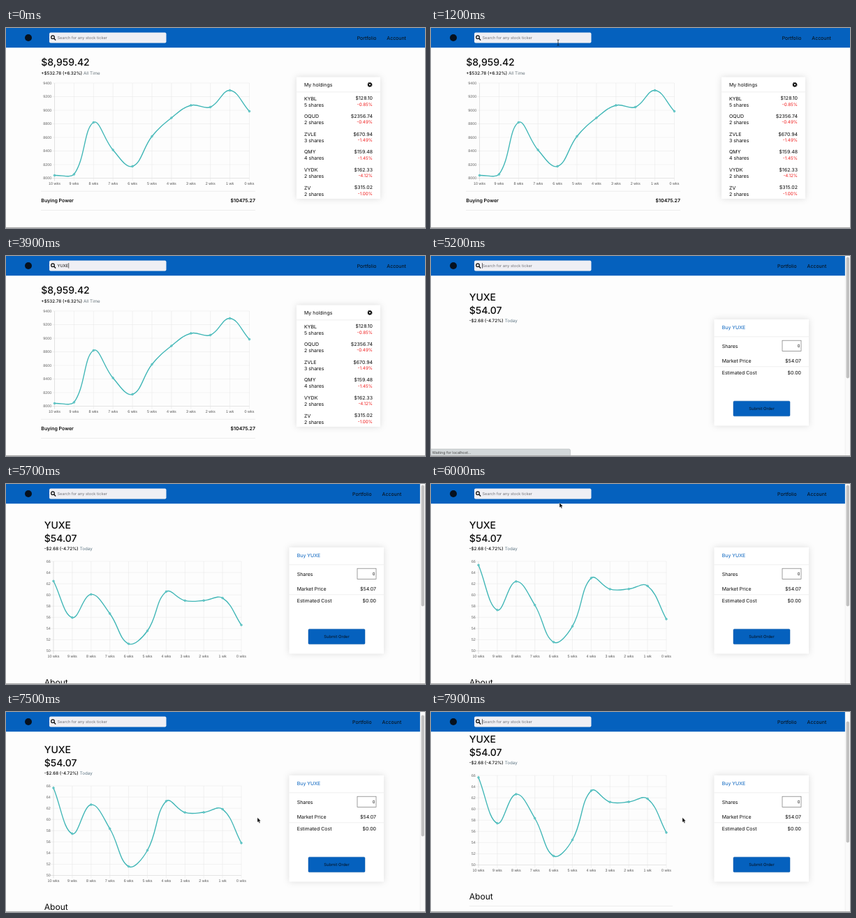
An HTML page for the animation above (8 s loop, 600 px wide and 287 px high).

```html
<!DOCTYPE html>
<html lang="en">
<head>
<meta charset="utf-8">
<title>Stock trading demo</title>
<style>
  html, body { margin: 0; width: 100%; height: 100%; overflow: hidden; background: #fdfdfd; }
  svg { display: block; width: 600px; height: 287px; }
  text { font-family: Inter, "Open Sans", sans-serif; text-rendering: geometricPrecision; white-space: pre; }
  .axis { font-family: "Liberation Sans", Arial, sans-serif; }
  .card { filter: drop-shadow(0 0 5px rgba(0, 0, 0, .13)); }
</style>
</head>
<body>
<svg id="stage" viewBox="0 0 600 287"></svg>
<script>
const LOOP = 8000, STEP = 100;
const BLUE = '#0561be', TEAL = '#3fb6b6', RED = '#f01e1e';
const TICKER = 'YUXE';

const text = (x, y, str, size = 7, opt = {}) => {
  const { fill = '#0a0a0a', weight = 400, anchor = 'start', cls = '' } = opt;
  return `<text x="${x}" y="${y}" font-size="${size}" fill="${fill}" font-weight="${weight}" text-anchor="${anchor}" class="${cls}">${str}</text>`;
};
const right = (x, y, str, size = 7, opt = {}) => text(x, y, str, size, { ...opt, anchor: 'end' });
const rect = (x, y, w, h, fill, extra = '') =>
  `<rect x="${x}" y="${y}" width="${w}" height="${h}" fill="${fill}" ${extra}/>`;
const line = (x1, y1, x2, y2, color = '#e4e4e4', w = .5) =>
  `<path d="M${x1} ${y1}L${x2} ${y2}" stroke="${color}" stroke-width="${w}"/>`;

// Chart geometry
const homeChart = {
  left: 69.5, right: 348.5, top: 79, bottom: 215.5, min: 8000, max: 9400, step: 200,
  ys: [211.5, 210, 135.5, 175, 198.5, 155.5, 129, 111, 113.5, 89.5, 119.5]
};
const stockChart = {
  left: 68, right: 337, top: 111, bottom: 239.5, min: 50, max: 66, step: 2,
  ys: [114, 179.7, 138, 172.5, 226.7, 203.5, 133, 149.2, 149, 144.5, 193]
};

function grid(c) {
  let out = '';
  const n = (c.max - c.min) / c.step;
  for (let i = 0; i <= n; i++) {
    const y = c.bottom - (c.bottom - c.top) * i / n;
    out += line(c.left - 4, y, c.right, y, i ? '#e4e4e4' : '#cccccc');
    out += right(c.left - 4.3, y + 1.9, c.min + i * c.step, 5.4, { fill: '#666', cls: 'axis' });
  }
  for (let i = 0; i <= 10; i++) {
    const x = c.left + (c.right - c.left) * i / 10;
    const weeks = 10 - i;
    out += line(x, c.top, x, c.bottom + 4, i ? '#e4e4e4' : '#c4c4c4');
    out += text(x, c.bottom + 9.8, weeks + (weeks === 1 ? ' wk' : ' wks'), 5.4,
      { fill: '#555', anchor: 'middle', cls: 'axis' });
  }
  return out;
}

// Smooth curve with tension .4, scaled up from the baseline by k
function curve(c, k = 1) {
  const pts = c.ys.map((y, i) => [c.left + (c.right - c.left) * i / 10, y]);
  const clamp = y => Math.max(c.top, Math.min(c.bottom, y));
  const grow = y => c.bottom - (c.bottom - y) * k;
  const at = (x, y) => `${x.toFixed(2)} ${grow(clamp(y)).toFixed(2)}`;
  const handles = pts.map((p, i) => {
    const a = pts[i - 1] || p, b = pts[i + 1] || p;
    const da = Math.hypot(p[0] - a[0], p[1] - a[1]);
    const db = Math.hypot(b[0] - p[0], b[1] - p[1]);
    const fa = .4 * da / (da + db), fb = .4 * db / (da + db);
    const dx = b[0] - a[0], dy = b[1] - a[1];
    return { before: [p[0] - fa * dx, p[1] - fa * dy], after: [p[0] + fb * dx, p[1] + fb * dy] };
  });
  let d = 'M' + at(...pts[0]);
  for (let i = 1; i < pts.length; i++)
    d += `C${at(...handles[i - 1].after)} ${at(...handles[i].before)} ${at(...pts[i])}`;
  const dots = pts.map(p =>
    `<circle cx="${p[0]}" cy="${grow(p[1])}" r="1.4" fill="#6cc9c9" stroke="${TEAL}" stroke-width=".5"/>`);
  return `<path d="${d}" fill="none" stroke="${TEAL}" stroke-width="1.35"/>` + dots.join('');
}

const holdings = [
  ['KYBL', 5, '128.10', '0.85'], ['OQUD', 2, '2356.74', '0.49'], ['ZVLE', 3, '670.94', '1.49'],
  ['QMY', 4, '159.48', '1.45'], ['VYDK', 2, '162.33', '4.12'], ['ZV', 2, '315.02', '1.00']
];

function homePage() {
  const rows = holdings.map(([name, count, price, loss], i) => {
    const y = 103.5 + 25.6 * i;
    return text(427, y, name) + text(427, y + 9, count + ' shares') +
      right(525, y - .2, '$' + price) + right(525, y + 8.2, `-${loss}%`, 6.3, { fill: RED });
  });
  const gear = `<g fill="none" stroke="#0a0a0a"><circle cx="521" cy="81.3" r="2" stroke-width="1.7"/>
    <circle cx="521" cy="81.3" r="3" stroke-width="1.1" stroke-dasharray="1.178"/></g>`;
  return text(50.3, 54.1, '$8,959.42', 14, { weight: 450 }) +
    text(50.3, 66.8, '+$532.78 (+6.32%)', 6.25, { weight: 500 }) +
    text(111, 66.8, 'All Time', 6.25, { fill: '#68757c' }) +
    grid(homeChart) + curve(homeChart) +
    line(50, 234.3, 357, 234.3, '#dcdcdc') + line(50, 261.5, 357, 261.5, '#dcdcdc') +
    text(50.3, 250.4, 'Buying Power', 7, { weight: 600 }) +
    right(357, 250.4, '$10475.27', 7, { weight: 600 }) +
    rect(416, 70.5, 120, 174.5, '#fff', 'class="card"') +
    text(427, 84, 'My holdings') + gear + line(416, 91.8, 536, 91.8, '#e0e0e0') + rows.join('');
}

function stockPage() {
  return `<g id="content">` +
    text(54.7, 63.6, TICKER, 14, { weight: 450 }) +
    text(54.7, 83.1, '$54.07', 14, { weight: 450 }) +
    text(54.7, 95.3, '-$2.68 (-4.72%)', 6.25, { weight: 500 }) +
    text(105.8, 95.3, 'Today', 6.2, { fill: '#5d7482' }) +
    `<g id="loaded">${grid(stockChart)}<g id="plot"></g>` +
    text(54.7, 288.9, 'About', 12.1) + line(55, 298.5, 346, 298.5, '#dcdcdc') + `</g></g>` +
    rect(405.5, 91, 135.5, 152.5, '#fff', 'class="card"') +
    text(416.7, 105.4, 'Buy ' + TICKER, 7, { fill: BLUE }) + line(405.5, 115.8, 541, 115.8, '#e0e0e0') +
    text(416.7, 131.5, 'Shares') +
    rect(503, 121.2, 27, 15.3, '#fff', 'stroke="#767676" stroke-width=".7"') + right(528.4, 131, '0', 5.8) +
    text(416.7, 152.5, 'Market Price') + right(530, 152.5, '$54.07') +
    line(405.5, 158.8, 541, 158.8, '#e0e0e0') +
    text(416.7, 170.2, 'Estimated Cost') + right(530, 170.2, '$0.00') +
    rect(433, 208.2, 81, 21.6, BLUE, 'rx="1.5" stroke="#0a55a4" stroke-width=".5"') +
    text(473.5, 221.1, 'Submit Order', 5.8, { anchor: 'middle', fill: '#06101c' });
}

const $ = id => document.getElementById(id);
$('stage').innerHTML =
  rect(0, 0, 600, 287, '#fdfdfd') +
  `<g id="home">${homePage()}</g><g id="stock">${stockPage()}</g>` +
  rect(0, 0, 600, 28.2, BLUE) +
  `<circle cx="32" cy="14" r="5" fill="#06111f"/>` +
  rect(62, 6.4, 167.5, 15.2, '#efeff4', 'rx="2"') +
  `<g fill="none" stroke="#0a0a0a" stroke-width="1.2"><circle cx="67" cy="13.2" r="2.3"/><path d="M68.7 15L71.2 17.5"/></g>` +
  `<text id="query" x="73.5" y="16.1"></text>` + rect(0, 10, .6, 7.6, '#111', 'id="caret"') +
  `<g id="nav">${text(502.7, 16.6, 'Portfolio')}${text(545.3, 16.6, 'Account')}</g>` +
  `<g id="bar">${rect(593, 0, 7, 287, '#fafafa')}${line(593.2, 0, 593.2, 287, '#e6e6e6')}` +
    rect(594.6, 1.5, 4.4, 174, '#c1c1c1', 'rx="2.2" id="thumb"') + `</g>` +
  `<g id="status"><path d="M-1 288V277H197.5Q199.5 277 199.5 279V288Z" fill="#d3d8da" stroke="#b2b6b8" stroke-width=".6"/>` +
    text(1.8, 284, 'Waiting for localhost...', 5.3, { fill: '#444' }) + `</g>` +
  rect(0, 286, 600, 1, '#a9a9a9') +
  `<path id="arrow" d="M0 0V6.8L1.6 5.4L2.7 8L3.9 7.5L2.8 5H4.9Z" fill="#000" stroke="#fff" stroke-width=".35"/>` +
  `<path id="beam" d="M-1.5 -4.2Q0 -4.2 0 -3Q0 -4.2 1.5 -4.2M0 -3V3M-1.5 4.2Q0 4.2 0 3Q0 4.2 1.5 4.2" fill="none" stroke="#111" stroke-width=".7"/>`;

const show = (id, on) => $(id).setAttribute('visibility', on ? 'visible' : 'hidden');
const move = (id, x, y) => $(id).setAttribute('transform', `translate(${x} ${y})`);
const within = (t, spans) => spans.some(([a, b]) => t >= a && t < b);

// Linear interpolation along [time, ...values] keys
function track(keys, t) {
  const i = keys.findIndex(k => k[0] > t);
  if (i === 0) return keys[0].slice(1);
  if (i < 0) return keys[keys.length - 1].slice(1);
  const a = keys[i - 1], b = keys[i], u = (t - a[0]) / (b[0] - a[0]);
  return a.slice(1).map((v, j) => v + (b[j + 1] - v) * u);
}

const pointer = [
  [300, 271, 156], [500, 271, 156], [600, 240, 111], [700, 205, 63], [800, 205, 63],
  [1100, 184, 24], [1300, 180, 18], [5900, 180, 18], [6100, 188, 36], [6500, 232, 129],
  [6800, 232, 129], [7200, 360, 151.5]
];
const pointerShown = [[300, 2700], [6000, LOOP]];
const scroll = [[7300, 0], [7400, 2], [7500, 5], [7600, 5], [7700, 9], [7800, 15], [7900, 20]];
const typed = [2700, 3100, 3400, 3900];
const caretShown = [
  [1600, 2100], [2600, 4400], [4900, 5600], [6100, 6600], [7000, 7500], [7900, LOOP]
];
const PAGE_AT = 5100, CHART_AT = 5370;

function draw(t) {
  const onStock = t >= PAGE_AT, loaded = t >= CHART_AT;
  $('home').style.display = onStock ? 'none' : '';
  $('stock').style.display = onStock ? '' : 'none';
  $('loaded').style.display = loaded ? '' : 'none';
  show('bar', onStock);
  show('status', onStock && t < 5500);
  move('nav', onStock ? -6.7 : 0, 0);

  const p = Math.min(1, Math.max(0, (t - CHART_AT) / 1000));
  $('plot').innerHTML = loaded ? curve(stockChart, 1 - (1 - p) ** 4) : '';

  const [offset] = track(scroll, t);
  move('content', 0, -offset);
  move('thumb', 0, offset * .6);

  const value = onStock ? '' : TICKER.slice(0, typed.filter(at => t >= at).length);
  const query = $('query');
  query.textContent = value || 'Search for any stock ticker';
  query.setAttribute('font-size', value ? 5.85 : 5.65);
  query.setAttribute('fill', value ? '#0a0a0a' : '#75757a');
  $('caret').setAttribute('x', value ? 73.7 + query.getComputedTextLength() : 73.1);
  show('caret', within(t, caretShown));

  const [x, y] = track(pointer, t);
  const visible = within(t, pointerShown);
  const overSearch = x > 62 && x < 229 && y < 22;
  show('arrow', visible && !overSearch);
  show('beam', visible && overSearch);
  move('arrow', x, y);
  move('beam', x, y);
}

const start = performance.now();
function tick() {
  const t = (performance.now() - start) % LOOP;
  draw(Math.floor(t / STEP) * STEP);
  requestAnimationFrame(tick);
}
tick();
</script>
</body>
</html>
```
